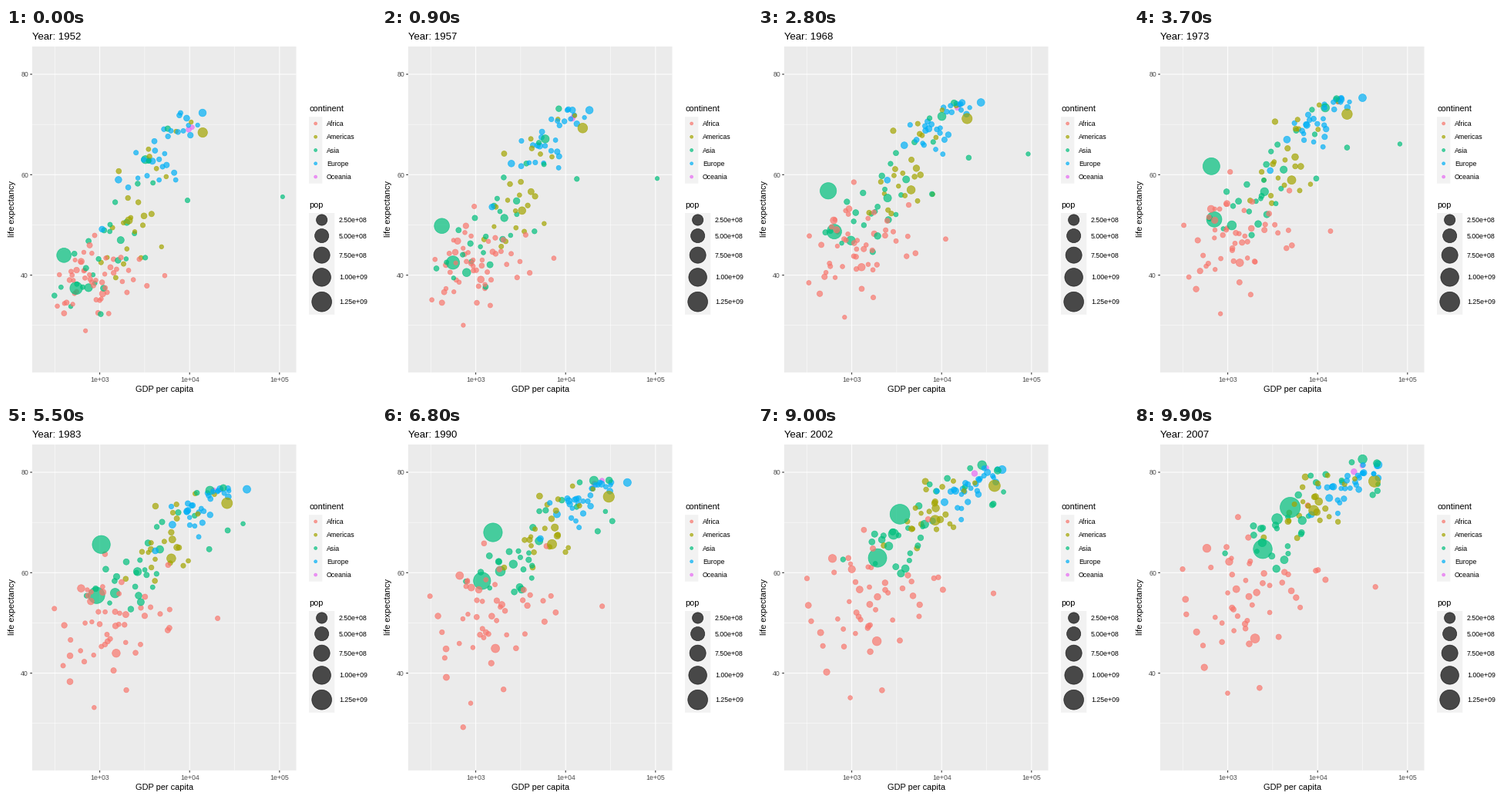
A matplotlib script that plays this animation: 480x480 px, repeating every 10000 ms.

```python
import numpy as np
import matplotlib.pyplot as plt
from matplotlib.animation import FuncAnimation
from matplotlib.colors import to_rgba
from matplotlib.patches import Rectangle

SIZE, FRAMES, STEP = 480, 100, 9
YEARS = np.arange(1952, 2008, 5)       # key poses
T = (YEARS - 1952) / 55
ALPHA, EDGE = 0.7, 0.71
plt.rcParams["font.family"] = "Liberation Sans"

COLORS = {"Africa": "#F8766D", "Americas": "#A3A500", "Asia": "#00BF7D",
          "Europe": "#00B0F6", "Oceania": "#E76BF3"}

rng = np.random.default_rng(7)


def px(log_income):
    return 121.6 + 116.6 * (log_income - 3)


def py(life):
    return 320.6 - 6.515 * (life - 40)


def dot_size(pop):
    return 2 + 10 * np.sqrt(pop / 1319)


def area(size):
    return (0.75 * (2.845 * size + 0.945)) ** 2


def ease(a, b, power=0.7):
    return a + (b - a) * T ** power


def shock(year, width):
    return np.exp(-((YEARS - year) / width) ** 2 / 2)


def scores(n, skew=0.0):
    """Shuffled, evenly stratified standard scores."""
    p = (np.arange(n) + 0.5) / n
    z = 4.91 * (p ** 0.14 - (1 - p) ** 0.14)
    if skew:
        z = np.sign(skew) * np.exp(skew * z)
        z = (z - z.mean()) / z.std()
    return rng.permutation(z)


def drift(n, skew=0.0):
    """Scores that slowly trade ranks over the key poses."""
    a = scores(n, skew)
    b = 0.85 * a + 0.53 * scores(n)
    return np.outer(a, 1 - T) + np.outer(b, T)


xs, ys, sizes, colors = [], [], [], []


def add(continent, x, y, pop):
    rows = np.atleast_2d(x)
    xs.append(rows)
    ys.append(np.atleast_2d(y))
    sizes.append(np.atleast_2d(dot_size(pop)))
    colors.extend([to_rgba(COLORS[continent], ALPHA)] * len(rows))


def leader(continent, pop, income, life, bends=(1, 1), dip=(0, 0), when=(1990, 3)):
    """One distinct bubble that eases between two states, with a passing dip."""
    hit = shock(*when)
    add(continent,
        ease(*np.log10(income), bends[0]) + dip[0] * hit,
        ease(*life, bends[1]) + dip[1] * hit,
        ease(*pop, 1))


def crowd(continent, n, skew, rho, pop, income, life):
    """Correlated cloud; income and life run from (mean, spread) to (mean, spread)."""
    a, b = drift(n, skew), drift(n, min(skew, 0))
    (mx, sx), (my, sy) = ([ease(*pair) for pair in zip(*ends)] for ends in (income, life))
    x = np.clip(mx + sx * a, 2.5, 4.67)
    y = my + sy * (rho * a + np.sqrt(1 - rho ** 2) * b)
    y = np.minimum(y, 72.3 + 9.3 * T ** 1.2)
    pops = np.exp(scores(n))[:, None] * ease(*pop, 1)
    add(continent, x + rng.normal(0, 0.015, x.shape),
        y + rng.normal(0, 0.25, y.shape), np.clip(pops, 0.1, 90))


crowd("Oceania", 2, 0, 0.8, (5, 10), [(4.01, 0.01), (4.47, 0.07)], [(69.3, 0.2), (80.7, 0.5)])
crowd("Africa", 50, 0.25, 0.45, (2.7, 9), [(2.96, 0.26), (3.25, 0.4)], [(39, 4.6), (55.5, 9)])
crowd("Americas", 23, 0.2, 0.65, (3, 9), [(3.43, 0.24), (3.93, 0.26)], [(52.8, 8.4), (73.5, 4)])
crowd("Asia", 28, 0.15, 0.75, (6, 19), [(3.12, 0.35), (3.77, 0.47)], [(46, 8.6), (70.8, 6.2)])
crowd("Europe", 30, -0.25, 0.82, (7.5, 10), [(3.7, 0.25), (4.37, 0.23)], [(64.6, 5.4), (77.8, 2.6)])

leader("Asia", (556, 1319), (400, 4959), (44, 73), (1.65, 0.5), (0, -11.8), (1962, 3))
leader("Asia", (372, 1110), (547, 2452), (37.4, 64.7), (1.8, 0.7))
leader("Asia", (82, 224), (750, 3541), (37.5, 70.7), (1.4, 1))
leader("Asia", (86, 127), (3217, 31656), (63, 82.6), (0.55, 0.65))
leader("Asia", (0.2, 2.5), (108382, 47307), (55.6, 77.6), (1.3, 0.75), (-0.42, 0), (1988, 6))
leader("Americas", (158, 301), (13990, 42952), (68.4, 78.2))
leader("Americas", (57, 190), (2109, 9066), (50.9, 72.4), (0.5, 1))
leader("Africa", (33, 135), (1077, 2014), (36.3, 46.9), (1, 0.55))
leader("Africa", (2.5, 9), (493, 863), (40, 46.2), (1, 1), (0, -21), (1992, 3.5))

# Mixed stacking, with the Oceania pair at the bottom.
order = np.r_[:2, 2 + rng.permutation(len(colors) - 2)]
X, Y, S = (np.vstack(v)[order] for v in (px(np.vstack(xs)), py(np.vstack(ys)), np.vstack(sizes)))
C = np.array(colors)[order]

fig = plt.figure(figsize=(SIZE / 72, SIZE / 72), dpi=72, facecolor="white")
ax = fig.add_axes([0, 0, 1, 1])
ax.set(xlim=(0, SIZE), ylim=(SIZE, 0))
ax.axis("off")


def box(x, y, w, h, color):
    ax.add_patch(Rectangle((x, y), w, h, fc=color, ec="none", zorder=0, snap=False))


def line(x, y, width, color="white"):
    ax.plot(x, y, color=color, lw=width, solid_capstyle="butt", zorder=1, snap=False)


def label(x, y, text, size, color="black", **kw):
    return ax.text(x, y, text, fontsize=size, color=color,
                   **{"va": "baseline", **kw})


def bubbles(x, y, size, color):
    return ax.scatter(x, y, s=area(size), c=color, edgecolors=color,
                      linewidths=EDGE, zorder=2)


def draw_panel():
    left, right, top, bottom = 34, 376.5, 24, 446.8
    box(left, top, right - left, bottom - top, "#EBEBEB")
    for v in (2.5, 3.5, 4.5):
        line([px(v)] * 2, [top, bottom], 0.53)
    for v in (30, 50, 70):
        line([left, right], [py(v)] * 2, 0.53)
    for v in (3, 4, 5):
        line([px(v)] * 2, [top, bottom], 1.07)
        line([px(v)] * 2, [bottom, bottom + 2.75], 1.07, "#333333")
        label(px(v), 459, f"1e+0{v}", 8.8, "#4D4D4D", ha="center")
    for v in (40, 60, 80):
        line([left, right], [py(v)] * 2, 1.07)
        line([left - 2.75, left], [py(v)] * 2, 1.07, "#333333")
        label(29, py(v) + 3.2, str(v), 8.8, "#4D4D4D", ha="right")
    label(205.3, 472, "GDP per capita", 11, ha="center")
    label(13, 234.4, "life expectancy", 11, ha="right", va="center", rotation=90)


def draw_legend(title, baseline, top, width, names, key_sizes, heights, color):
    left = 393
    label(left, baseline, title, 11)
    edges = top + np.r_[0, np.cumsum(heights)]
    middles = (edges[:-1] + edges[1:]) / 2
    box(left, top, width, edges[-1] - top, "#F2F2F2")
    for name, y in zip(names, middles):
        label(left + width + 5.5, y + 3.1, name, 8.8)
    bubbles(np.full(len(names), left + width / 2), middles, key_sizes, color)


draw_panel()
draw_legend("continent", 107.7, 115.3, 17.28, COLORS, np.full(5, 1.5), [17.28] * 5,
            [to_rgba(c, ALPHA) for c in COLORS.values()])
pops = np.arange(250, 1251, 250)
draw_legend("pop", 233, 240, 33.3, [f"{p * 1e6:.2e}" for p in pops], dot_size(pops),
            2.835 * dot_size(pops), [to_rgba("black", ALPHA)] * 5)
title = label(34, 15, "", 13.2)
dots = bubbles(X[:, 0], Y[:, 0], S[:, 0], C)


def pose(table, frame):
    k = min(frame // STEP, len(T) - 2)
    t = frame / STEP - k
    return table[:, k] * (1 - t) + table[:, k + 1] * t


def update(frame):
    title.set_text(f"Year: {round(1952 + 55 * frame / (FRAMES - 1))}")
    dots.set_offsets(np.column_stack([pose(X, frame), pose(Y, frame)]))
    dots.set_sizes(area(pose(S, frame)))
    return dots, title


anim = FuncAnimation(fig, update, frames=FRAMES, interval=100, repeat=True,
                     repeat_delay=0, blit=False)
plt.show()
```
